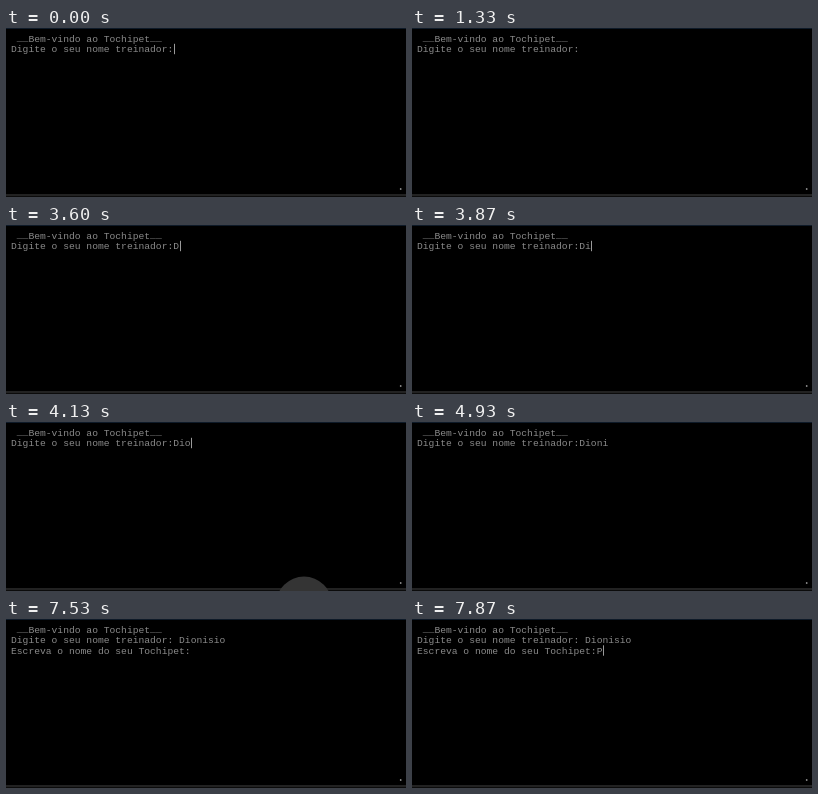
These frames come from a looping animation (400 by 169 pixels, 8000 ms). An HTML page:

```html
<!DOCTYPE html>
<html lang="pt">
<head>
<meta charset="utf-8">
<style>
  html, body { margin: 0; width: 100%; height: 100%; overflow: hidden; background: #000; }
  svg { display: block; width: 400px; height: 169px; }
  text { font: 9.67px "Liberation Mono", monospace; fill: #8a8a8a; white-space: pre; }
</style>
</head>
<body>
<svg viewBox="0 0 400 169">
  <rect width="400" height="169" fill="#000"/>
  <rect width="400" height="1" fill="#0e1a28"/>
  <rect y="166" width="400" height="2" fill="#222"/>
  <rect y="168" width="400" height="1" fill="#0b0b0b"/>
  <circle cx="394.7" cy="161" r="0.9" fill="#8c8c8c"/>
  <circle id="touch" cy="182.5" r="28" fill="#343434"/>
  <text x="10.8" y="14"><tspan dy="-0.7">__</tspan><tspan dy="0.7">Bem-vindo ao Tochipet</tspan><tspan dy="-0.7">__</tspan></text>
  <text id="line1" x="5" y="24.3"></text>
  <text id="line2" x="5" y="34.6"></text>
  <rect id="caret" width="1" height="10.4" fill="#9a9a9a"/>
</svg>
<script>
const LOOP = 8000, LEFT = 5, PITCH = 5.802;
const ASK_NAME = "Digite o seu nome treinador:";
const ASK_PET = "Escreva o nome do seu Tochipet:";
const NAME = "Dionisio";

// [time, typed text]
const nameKeys = [
  [0, ""], [3600, NAME.slice(0, 1)], [3870, NAME.slice(0, 2)], [4070, NAME.slice(0, 3)],
  [4270, NAME.slice(0, 4)], [4400, NAME.slice(0, 5)], [5000, ` ${NAME} `]
];
const petKeys = [[0, ""], [6070, ASK_PET], [7870, ASK_PET + "P"]];

// [from, to] while the caret shows
const caretOn = [
  [0, 330], [870, 1330], [1870, 2330], [2870, 3330], [3600, 4930],
  [5000, 5530], [6000, 6530], [7070, 7530], [7870, LOOP]
];

// [from, to, x] of each finger press
const presses = [[3730, 3870, 298], [4130, 4270, 298], [7730, 7870, 371]];

const el = id => document.getElementById(id);
const touch = el("touch"), line1 = el("line1"), line2 = el("line2"), caret = el("caret");

const valueAt = (keys, t) => keys.filter(k => k[0] <= t).pop()[1];
const spanAt = (spans, t) => spans.find(s => t >= s[0] && t < s[1]);
const show = (node, on) => node.setAttribute("visibility", on ? "visible" : "hidden");
const write = (node, s) => { if (node.textContent !== s) node.textContent = s; };

function draw(t) {
  const first = ASK_NAME + valueAt(nameKeys, t);
  const second = valueAt(petKeys, t);
  write(line1, first);
  write(line2, second);

  const current = second || first;
  caret.setAttribute("x", Math.round(LEFT + current.length * PITCH + 0.4));
  caret.setAttribute("y", second ? 26.3 : 15.8);
  show(caret, spanAt(caretOn, t));

  const press = spanAt(presses, t);
  if (press) touch.setAttribute("cx", press[2]);
  show(touch, press);
}

const start = performance.now();
function tick() {
  draw((performance.now() - start) % LOOP);
  requestAnimationFrame(tick);
}
tick();
</script>
</body>
</html>
```
